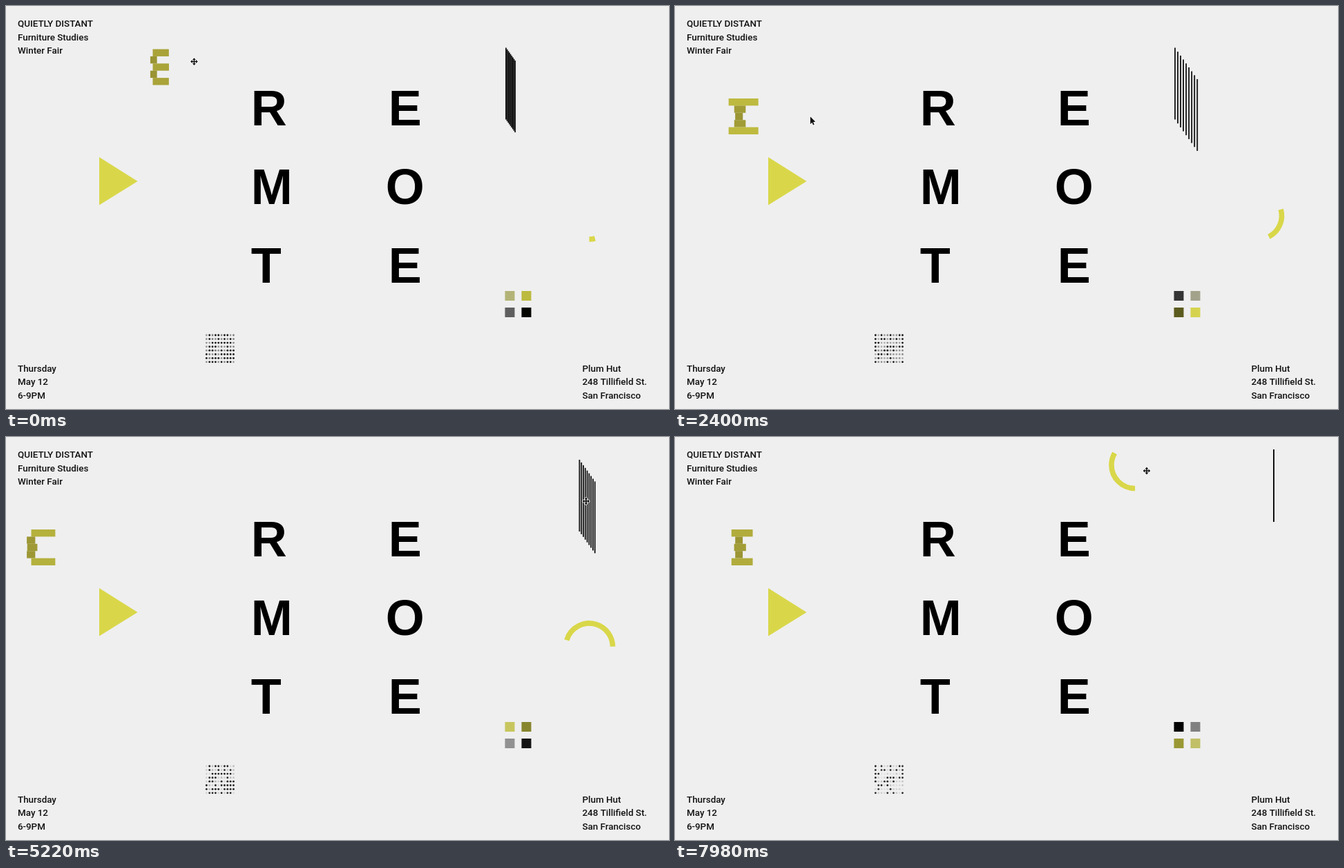
An HTML page with a canvas that plays this animation: 960x584 px, repeating every 8000 ms.

```html
<!DOCTYPE html>
<html lang="en">
<head>
<meta charset="utf-8">
<title>Poster</title>
<style>
html, body { margin: 0; width: 100%; height: 100%; overflow: hidden; background: #efefef; }
canvas { display: block; }
</style>
</head>
<body>
<canvas id="stage" width="960" height="584"></canvas>
<script>
const ctx = document.getElementById('stage').getContext('2d');
const LOOP = 8, CYCLE = 3.6, TAU = 2 * Math.PI;
const YELLOW = [217, 215, 73], OLIVE = [154, 148, 52], GREY = [152, 152, 152], BLACK = [0, 0, 0];

const clamp = v => Math.max(0, Math.min(1, v));
const mod = (v, n) => ((v % n) + n) % n;
const mix = (a, b, u) => a.map((v, i) => v + (b[i] - v) * u);
const rgb = c => `rgb(${c.map(Math.round).join(',')})`;
const wave = u => (1 - Math.cos(TAU * u)) / 2;

// The CSS "ease" curve: cubic-bezier(.25, .1, .25, 1)
function ease(x) {
  x = clamp(x);
  const curve = (s, a, b) => 3 * (1 - s) * (1 - s) * s * a + 3 * (1 - s) * s * s * b + s * s * s;
  let lo = 0, hi = 1;
  for (let i = 0; i < 20; i++) {
    const mid = (lo + hi) / 2;
    if (curve(mid, .25, .25) < x) lo = mid; else hi = mid;
  }
  return curve(lo, .1, 1);
}

// Position on a path of [time, x, y] points
function along(path, t) {
  const next = path.findIndex(p => p[0] > t);
  if (next < 0) return path[path.length - 1].slice(1);
  if (next === 0) return path[0].slice(1);
  const a = path[next - 1], b = path[next];
  return mix(a, b, (t - a[0]) / (b[0] - a[0])).slice(1);
}

const barPath = [[0, 238, 62.5], [2.18, 58.5, 134]];
const stripePath = [[4.85, 724, 60.5], [5.22, 830.3, 33], [5.6, 867, 18.5]];
const arcPath = [[6.8, 844.5, 304], [7.95, 666, 40.5]];

// The pointer visits each part and drags it away
const pointerPath = [
  [0, 272.5, 80.5], [2.18, 72, 160], [3.12, 599, 161], [3.9, 751.5, 143.5],
  ...stripePath.map(([t, x, y]) => [t, x + 9.5, y + 60]),
  [6.54, 830.5, 277], ...arcPath.map(([t, x, y]) => [t, x + 17, y + 8.5])
];

function drawText() {
  ctx.fillStyle = '#111';
  ctx.font = '500 13.4px Roboto, sans-serif';
  const block = (x, y, lines) => lines.forEach((s, i) => ctx.fillText(s, x, y + i * 19.5));
  block(17, 30, ['QUIETLY DISTANT', 'Furniture Studies', 'Winter Fair']);
  block(17, 529.5, ['Thursday', 'May 12', '6-9PM']);
  block(834.5, 529.5, ['Plum Hut', '248 Tillifield St.', 'San Francisco']);

  ctx.fillStyle = '#000';
  ctx.font = 'bold 72px "Liberation Sans", Arial, sans-serif';
  ['RE', 'MO', 'TE'].forEach(([left, right], row) => {
    const y = 172.7 + row * 114.3;
    ctx.fillText(left, 354.7, y);
    ctx.fillText(right, 577.8 - ctx.measureText(right).width / 2, y);
  });
}

function drawTriangle() {
  ctx.fillStyle = rgb(YELLOW);
  polygon([[135, 219], [190.5, 254], [135, 288.5]]);
  ctx.fill();
}

// Rows sway at one rate and stretch at twice that rate
function drawBars(t) {
  const [x, y] = along(barPath, t);
  for (let row = 0; row < 5; row++) {
    const sway = .5 + t / (CYCLE * 1.5) + (1 - Math.abs(row - 2)) * .08;
    const size = wave(2 * sway);
    ctx.fillStyle = rgb(mix(OLIVE, YELLOW, size));
    ctx.fillRect(x + 29 * Math.cos(TAU * sway), y + row * 10.4, 9.7 + 59 * size, 10.4);
  }
}

function drawStripes(t) {
  const [x, y] = along(stripePath, t);
  const opening = mod(t - .87, CYCLE), closing = opening - 1.76;
  const open = closing < 0 ? ease(opening / 1.9) : 1 - wave(clamp(closing / 1.72) / 2);
  const gap = 33 * open / 8;
  ctx.fillStyle = '#111';
  for (let i = 0; i < 9; i++) ctx.fillRect(x - .9 + i * gap, y + i * gap * 1.41, 1.8, 104);
}

// The tail repeats the head a quarter cycle later
function drawArc(t) {
  const [x, y] = along(arcPath, t);
  const angle = s => TAU * (.25 + Math.floor(s / CYCLE) + ease(mod(s, CYCLE) / CYCLE));
  ctx.strokeStyle = rgb(YELLOW);
  ctx.lineWidth = 7.6;
  ctx.beginPath();
  ctx.arc(x, y, 34, angle(t - CYCLE / 4), angle(t));
  ctx.stroke();
}

// Yellow fades to grey, then black, then returns; u counts quarters
function tint(u) {
  if (u < 1.3) return mix(YELLOW, GREY, u / 1.3);
  if (u < 2.5) return mix(GREY, BLACK, (u - 1.3) / 1.2);
  return mix(BLACK, YELLOW, clamp((u - 2.75) / 1.25) ** .65);
}

function drawSquares(t) {
  const u = .75 + t * 8 / CYCLE;
  for (let i = 0; i < 4; i++) {
    const right = i === 1 || i === 2, low = i > 1;
    ctx.fillStyle = rgb(tint(mod(u - i, 4)));
    ctx.fillRect(right ? 746.5 : 722.5, low ? 437 : 413, 14, 14);
  }
}

// Every dot pulses twice a cycle; about half of them run late
function drawDots(t) {
  const noise = n => mod(Math.sin(n * 12.9898) * 43758.5453, 1);
  ctx.fillStyle = '#000';
  for (let i = 0; i < 80; i++) {
    const delay = (noise(i + 1) < .5 ? 0 : .55) + (noise(i + 101) - .5) * .12;
    ctx.globalAlpha = .95 * wave((t - delay) * 2 / CYCLE + .5) ** .7;
    ctx.beginPath();
    ctx.arc(290.3 + i % 10 * 4.35, 477 + Math.floor(i / 10) * 5.55, 1.4, 0, TAU);
    ctx.fill();
  }
  ctx.globalAlpha = 1;
}

function polygon(points) {
  ctx.beginPath();
  points.forEach(([x, y]) => ctx.lineTo(x, y));
  ctx.closePath();
}

const arrow = [[0, 0], [0, 11], [2.4, 8.6], [4.2, 12.2], [5.8, 11.4], [4.2, 8], [7.4, 7.6]];
const arm = [[-.8, -.8], [-.8, -2.6], [-2.5, -2.6], [0, -5.4], [2.5, -2.6], [.8, -2.6]];
const moveSign = [0, 1, 2, 3].flatMap(k => {
  const c = Math.cos(k * TAU / 4), s = Math.sin(k * TAU / 4);
  return arm.map(([x, y]) => [x * c - y * s, x * s + y * c]);
});

function drawPointer(t) {
  const [x, y] = along(pointerPath, t);
  const near = (path, dx, dy) => {
    const [px, py] = along(path, t);
    return Math.hypot(px + dx - x, py + dy - y) < 60;
  };
  const canDrag = near(barPath, 0, 26) || near(stripePath, 10, 60) || near(arcPath, 0, 0);
  ctx.save();
  ctx.translate(x, y);
  ctx.strokeStyle = '#fff';
  ctx.fillStyle = '#111';
  ctx.lineWidth = 1.4;
  polygon(canDrag ? moveSign : arrow);
  ctx.stroke();
  ctx.fill();
  ctx.restore();
}

function draw(now) {
  const t = (now / 1000) % LOOP;
  ctx.fillStyle = '#efefef';
  ctx.fillRect(0, 0, 960, 584);
  drawText();
  drawTriangle();
  [drawBars, drawStripes, drawArc, drawSquares, drawDots, drawPointer].forEach(part => part(t));
}

const start = performance.now();
function tick() {
  draw(performance.now() - start);
  requestAnimationFrame(tick);
}
tick();
</script>
</body>
</html>
```
